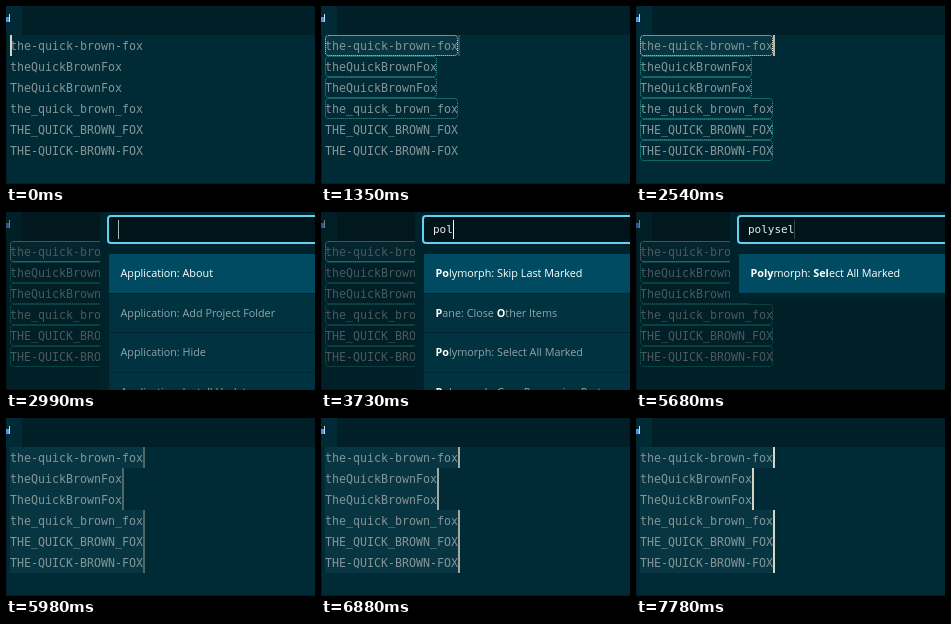
An HTML page with a canvas for the animation above (7880 ms loop, 309x178 px).

```html
<!DOCTYPE html>
<html lang="en">
<head>
<meta charset="utf-8">
<style>
html, body { margin: 0; width: 100%; height: 100%; overflow: hidden; background: #002b36; }
canvas { display: block; }
</style>
</head>
<body>
<canvas id="stage" width="309" height="178"></canvas>
<script>
const ctx = document.getElementById('stage').getContext('2d', { alpha: false });
const LOOP = 7880, ROW = 21, CHAR = 7, LEFT = 4, TOP = 29;
const OPEN = 2840, CLOSE = 5830;
const MONO = '11.63px "DejaVu Sans Mono", monospace';
const INPUT = '11px "DejaVu Sans Mono", monospace';
const UI = '10.8px "Open Sans", sans-serif';

const lines = ['the-quick-brown-fox', 'theQuickBrownFox', 'TheQuickBrownFox',
  'the_quick_brown_fox', 'THE_QUICK_BROWN_FOX', 'THE-QUICK-BROWN-FOX'];
const markTimes = [300, 600, 900, 1200, 1500, 1800];

const queries = [[OPEN, ''], [3290, 'p'], [3440, 'po'], [3730, 'pol'],
  [4030, 'poly'], [4480, 'polys'], [4630, 'polyse'], [4780, 'polysel']];

// Asterisks enclose the matched letters
const polymorphList = match => ['Skip Last Marked', 'Select All Marked', 'Mark Next', 'Case Processing Part']
  .map(name => `*${match}*${'Polymorph'.slice(match.length)}: ${name}`);
const poList = polymorphList('Po');
poList.splice(1, 2, '*P*ane: Close *O*ther Items', poList[1]);
const lists = [
  [OPEN, ['Application: About', 'Application: Add Project Folder', 'Application: Hide', 'Application: Install Update']],
  [3290, ['*P*ane: Close', '*P*ane: Close Other Items', '*P*ane: Split Down', '*P*ane: Split Left']],
  [3590, poList],
  [3880, polymorphList('Pol')],
  [4030, polymorphList('Poly')],
  [4630, ['*Poly*morph: *Sel*ect All Marked']],
];

const latest = (steps, t) => steps.filter(s => s[0] <= t).pop();
const pulse = (t, peak) => 0.5 + 0.5 * Math.cos((t - peak) / 800 * 2 * Math.PI);

function rect(color, x, y, w, h) {
  ctx.fillStyle = color;
  ctx.fillRect(x, y, w, h);
}

// Returns the x position after the drawn text
function text(str, x, y, color, font) {
  ctx.font = font;
  ctx.fillStyle = color;
  ctx.fillText(str, x, y);
  return x + ctx.measureText(str).width;
}

function cursor(x, y, w, h, alpha, color = '#ddd9c8') {
  ctx.globalAlpha = alpha;
  rect(color, x, y, w, h);
  ctx.globalAlpha = 1;
}

function dottedBox(row, color) {
  ctx.strokeStyle = color;
  ctx.lineWidth = 1;
  ctx.setLineDash([1, 1]);
  ctx.beginPath();
  ctx.roundRect(LEFT + 0.5, TOP + row * ROW + 0.5, lines[row].length * CHAR - 1, ROW - 1, 3);
  ctx.stroke();
  ctx.setLineDash([]);
}

function drawEditor(t) {
  const allSelected = t >= CLOSE;
  rect('#002b36', 0, 0, 309, 178);
  rect('#001f27', 16, 0, 293, TOP);
  rect('#001f27', 0, TOP, 1, 149);
  rect('#001f27', 0, 177, 309, 1);
  rect('#4f92e8', 0, 11, 3, 5);
  rect('#c8dcf0', 3, 8, 1, 8);

  lines.forEach((line, i) => {
    const y = TOP + i * ROW, end = LEFT + line.length * CHAR;
    const marked = t >= markTimes[i];
    if (allSelected || (i === 0 && marked)) rect('#073642', LEFT, y, end - LEFT, ROW);
    text(line, LEFT, y + 15, '#839496', MONO);
    if (allSelected) cursor(end, y, 2, ROW, pulse(t, 7820));
    else if (marked) dottedBox(i, i ? '#2aa198' : '#eee8d5');
  });
  if (t < OPEN) cursor(t < markTimes[0] ? LEFT : LEFT + lines[0].length * CHAR, TOP, 2, ROW, pulse(t, 30));
}

function drawItem(item, i) {
  const y = 42 + i * 39.5;
  rect(i ? '#00323f' : '#004b61', 103, y, 206, 39);
  rect('#001f28', 103, y + 39, 206, 1);
  let x = 114.5;
  item.split('*').forEach((part, k) => {
    const bold = k % 2;
    x = text(part, x, y + 23, bold || !i ? '#ffffff' : '#93a4a8', (bold ? 'bold ' : '') + UI);
  });
}

function drawPalette(t) {
  const [typedAt, query] = latest(queries, t);
  const items = latest(lists, t)[1];
  rect('rgba(0, 16, 20, 0.45)', 0, 0, 309, 178);
  rect('#00222b', 94, 0, 215, 51 + items.length * 39.5);

  ctx.beginPath();
  ctx.roundRect(102, 4, 230, 27, 3);
  ctx.fillStyle = '#00141a';
  ctx.fill();
  ctx.strokeStyle = '#62d2f0';
  ctx.lineWidth = 2;
  ctx.stroke();

  const end = text(query, 112, 21, '#e8ecec', INPUT);
  const idle = Math.max(0, t - typedAt - (query ? 380 : 0));
  cursor(Math.round(end), 8, 1, 19, pulse(idle, 0), '#ffffff');
  items.forEach(drawItem);
}

function frame(now) {
  const t = now % LOOP;
  drawEditor(t);
  if (t >= OPEN && t < CLOSE) drawPalette(t);
  requestAnimationFrame(() => frame(performance.now() - start));
}

const start = performance.now();
frame(0);
</script>
</body>
</html>
```
